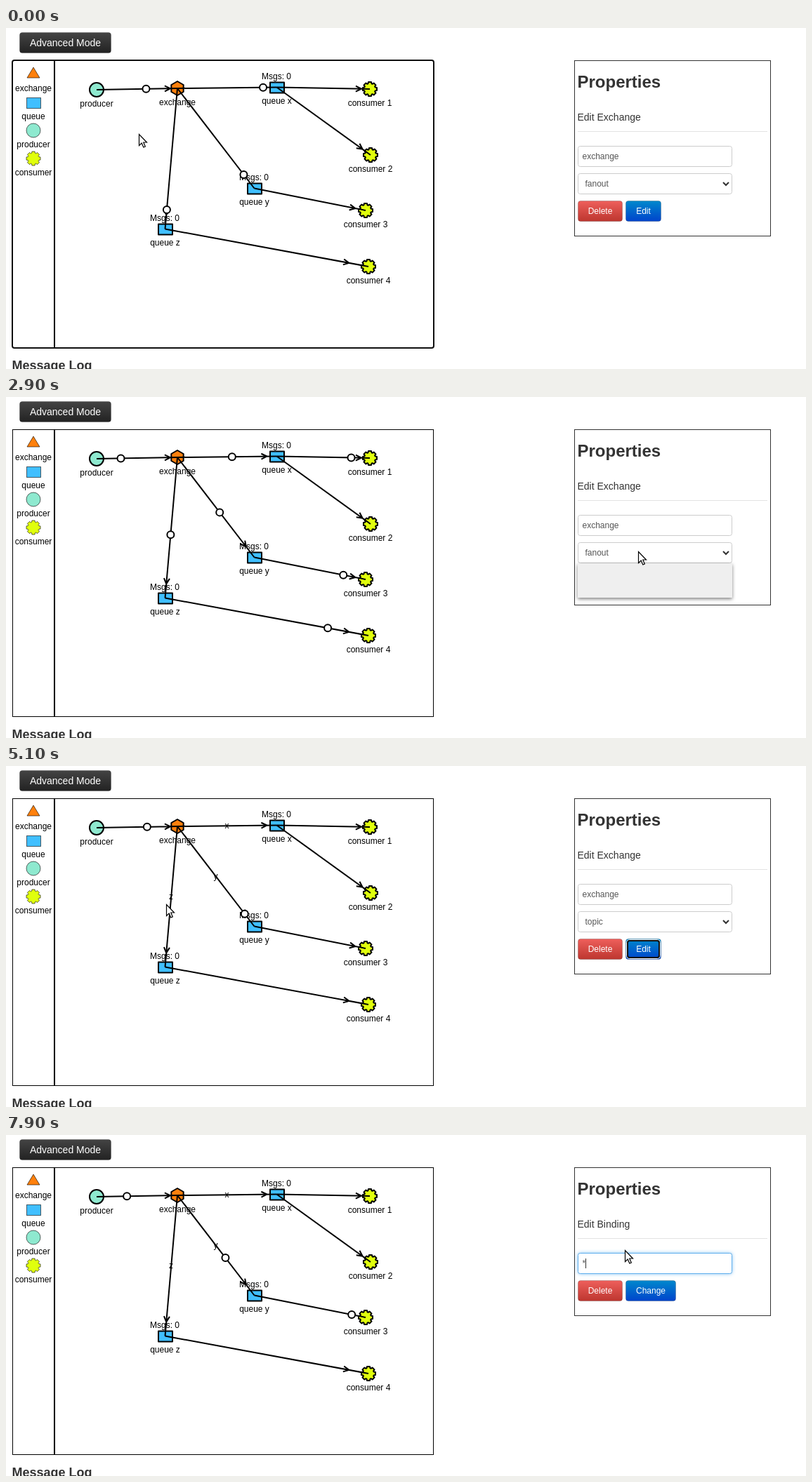
Write an HTML page that moves like this. It is 1139x486 px and loops after 8000 ms.

```html
<!DOCTYPE html>
<html lang="en">
<head>
<meta charset="utf-8">
<title>Message routing simulator</title>
<style>
html, body { margin: 0; width: 100%; height: 100%; overflow: hidden; background: #fff; }
svg { display: block; }
text { font: 12px "Liberation Sans", Arial, sans-serif; white-space: pre; }
.node { stroke: #000; stroke-width: 2; stroke-linejoin: round; }
.icon { stroke: #000; stroke-opacity: .6; stroke-width: 1; }
.line { fill: none; stroke: #000; stroke-width: 2; }
.mid { text-anchor: middle; }
.white { fill: #fff; }
.field { fill: #555; }
.box { fill: #fff; stroke: #ccc; }
</style>
</head>
<body>
<svg width="1139" height="486" viewBox="0 0 1139 486">
  <defs>
    <linearGradient id="dark" x2="0" y2="1"><stop stop-color="#444"/><stop offset="1" stop-color="#222"/></linearGradient>
    <linearGradient id="red" x2="0" y2="1"><stop stop-color="#ee5f5b"/><stop offset="1" stop-color="#bd362f"/></linearGradient>
    <linearGradient id="blue" x2="0" y2="1"><stop stop-color="#08c"/><stop offset="1" stop-color="#04c"/></linearGradient>
    <filter id="shadow" x="-10%" y="-20%" width="120%" height="150%"><feDropShadow dx="0" dy="2" stdDeviation="2.5" flood-opacity=".5"/></filter>
    <filter id="glow" x="-10%" y="-50%" width="120%" height="200%"><feDropShadow dx="0" dy="0" stdDeviation="2.5" flood-color="#52a8ec" flood-opacity=".7"/></filter>
  </defs>
  <g id="page"></g>
  <g id="live"></g>
</svg>
<script>
const LOOP = 8000, STEP = 100, LEG = 800, EMIT = 1000;
const ORANGE = '#ff800d', BLUE = '#40bfff', MINT = '#8ee9cf', LIME = '#e0ff0d';

const text = (x, y, s, cls = '', style = '') => `<text x="${x}" y="${y}" class="${cls}" style="${style}">${s}</text>`;
const rect = (x, y, w, h, attrs) => `<rect x="${x}" y="${y}" width="${w}" height="${h}" ${attrs}/>`;
const path = (d, attrs) => `<path d="${d}" ${attrs}/>`;
const circle = (x, y, r, attrs) => `<circle cx="${x}" cy="${y}" r="${r}" ${attrs}/>`;
const polar = (x, y, r, a) => `${(x + r * Math.cos(a)).toFixed(2)} ${(y + r * Math.sin(a)).toFixed(2)}`;

function button(x, y, w, label, fill, size = 12) {
  return rect(x + .5, y + .5, w - 1, 29, `rx="3.5" fill="${fill}" stroke="#000" stroke-opacity=".2"`) +
    text(x + w / 2, y + (size > 12 ? 20 : 19), label, 'mid white', `font-size:${size}px`);
}

// Shapes
function gear(x, y, cls) {
  const points = [];
  for (let i = 0; i < 8; i++) {
    const a = i * Math.PI / 4;
    for (const [r, da] of [[8, -.32], [10.2, -.2], [10.2, .2], [8, .32]]) points.push(polar(x, y, r, a + da));
  }
  return path(`M${points.join('L')}Z`, `fill="${LIME}" class="${cls}"`);
}
function hexagon(x, y) {
  const points = [...Array(6)].map((_, i) => polar(x, y, 10, (i + .5) * Math.PI / 3));
  return path(`M${points.join('L')}Z`, `fill="${ORANGE}" class="node"`);
}

const nodes = {
  producer: [129, 88, 'producer', 112],
  exchange: [244, 86, 'exchange', 110],
  x: [385.5, 84.5, 'queue x', 108],
  y: [353.5, 228.5, 'queue y', 252],
  z: [226.5, 286.5, 'queue z', 310],
  c1: [518, 87, 'consumer 1', 111],
  c2: [519, 181, 'consumer 2', 205],
  c3: [512, 260, 'consumer 3', 284],
  c4: [516, 340, 'consumer 4', 364]
};
// start node, end node, gap between arrow tip and end node
const edges = [
  ['producer', 'exchange', 10], ['exchange', 'x', 14], ['exchange', 'y', 19], ['exchange', 'z', 20],
  ['x', 'c1', 12], ['x', 'c2', 14], ['y', 'c3', 15], ['z', 'c4', 28]
];

function nodeShape(key) {
  const [x, y, label, baseline] = nodes[key];
  const caption = text(x, baseline, label, 'mid');
  if (key === 'producer') return circle(x, y, 10, `fill="${MINT}" class="node"`) + caption;
  if (key === 'exchange') return hexagon(x, y) + caption;
  if (key[0] === 'c') return gear(x, y, 'node') + caption;
  return rect(x - 9.5, y - 7, 20, 15, `fill="${BLUE}" class="node"`) + caption + text(x - .5, baseline - 35, 'Msgs: 0', 'mid');
}
function edgeShape([from, to, gap]) {
  const [x1, y1] = nodes[from], [x2, y2] = nodes[to];
  const a = Math.atan2(y2 - y1, x2 - x1);
  const tx = x2 - gap * Math.cos(a), ty = y2 - gap * Math.sin(a);
  const wing = side => polar(tx, ty, 9, a + Math.PI + side * .46);
  return path(`M${x1} ${y1}L${x2} ${y2}M${wing(1)}L${tx} ${ty}L${wing(-1)}`, 'class="line"');
}

document.getElementById('page').innerHTML =
  button(19, 6, 131, 'Advanced Mode', 'url(#dark)', 14) +
  rect(9.5, 46.5, 599, 409, 'fill="#fff" stroke="#000"') +
  path('M69 46V456', 'class="line"') +
  path('M39 56L48 71H30Z', `fill="${ORANGE}" class="icon"`) + text(39, 90, 'exchange', 'mid') +
  rect(29.5, 99.5, 20, 15, `fill="${BLUE}" class="icon"`) + text(39, 130, 'queue', 'mid') +
  circle(39, 146, 10, `fill="${MINT}" class="icon"`) + text(39, 170, 'producer', 'mid') +
  gear(39, 186, 'icon') + text(39, 210, 'consumer', 'mid') +
  text(8.5, 487, 'Message Log', '', 'font-size:18px;font-weight:bold;fill:#333') +
  text(813.5, 85, 'Properties', '', 'font-size:24px;font-weight:bold;fill:#333') +
  path('M814 147.5H1084', 'stroke="#e3e3e3"') +
  Object.keys(nodes).map(nodeShape).join('') + edges.map(edgeShape).join('');

// Simulation time: the page stalls briefly while the list opens
function simClock(t) {
  if (t < 2700) return Math.min(t, 2400) + 490;
  return t + (t < 3500 ? 340 : 400);
}

function messages(clock) {
  const dots = [];
  const newest = Math.floor(clock / EMIT);
  for (let n = newest - 2; n <= newest; n++) {
    const age = clock - n * EMIT, leg = Math.floor(age / LEG), p = age / LEG - leg;
    const queues = n < 4 ? ['x', 'y', 'z'] : ['y'];
    const consumers = { x: n % 2 ? 'c1' : 'c2', y: 'c3', z: 'c4' };
    const hops = [[['producer', 'exchange']], queues.map(q => ['exchange', q]), queues.map(q => [q, consumers[q]])][leg] || [];
    for (const [from, to] of hops) {
      const [x1, y1] = nodes[from], [x2, y2] = nodes[to];
      dots.push(circle(x1 + (x2 - x1) * p, y1 + (y2 - y1) * p, 5, 'fill="#fff" class="node"'));
    }
  }
  return dots.join('');
}

// time, x, y
const pointer = [
  [0, 189, 151], [800, 189, 151], [1400, 255, 73], [1700, 255, 73], [1800, 535, 137], [2400, 811, 195],
  [2700, 900, 220], [3000, 900, 220], [3400, 885, 277], [3600, 885, 277], [4000, 908, 262], [4400, 908, 262],
  [5000, 228, 197], [5500, 228, 197], [6500, 848, 194], [6800, 848, 194], [7100, 881, 164], [LOOP, 881, 164]
];
function cursor(t) {
  const i = pointer.findIndex(k => k[0] > t);
  const [t0, x0, y0] = pointer[i - 1], [t1, x1, y1] = pointer[i];
  const p = (t - t0) / (t1 - t0), x = x0 + (x1 - x0) * p, y = y0 + (y1 - y0) * p;
  const at = `transform="translate(${x} ${y})"`;
  if (t >= 6400 && t <= 6900)
    return path('M-3-7.5H-1L0-6.5 1-7.5H3M0-6.5V7M-3 8H-1L0 7 1 8H3', `${at} fill="none" stroke="#000" stroke-width="1.6"`);
  if (t >= 3900 && t <= 4400)
    return path('M0 .5Q1.5-.5 2 1.5V6L9 7.5Q10.5 8 10 10L9 13V16H1V13L-4 8.5Q-4 6.5-2 7.5L-.5 9V1Z', `${at} fill="#fff" stroke="#000" stroke-width="1.2"`) +
      path('M3 9V12M5 9V12M7 9V12', `${at} stroke="#000"`);
  return path('M.5.5V16.5L4.2 13 6.8 19 9.3 18 6.8 12H11.5Z', `${at} fill="#fff" stroke="#000" stroke-width="1.2"`);
}

function focusRing(x, y, w, h) {
  return rect(x, y, w, h, 'rx="3" fill="none" stroke="#101010" stroke-width="2"');
}

function exchangePanel(t) {
  const open = t >= 2700 && t < 3600;
  let out = rect(809.5, 46.5, 279, 250, 'fill="none" stroke="#333"') +
    text(813.5, 132, 'Edit Exchange', '', 'font-size:14px;fill:#333') +
    rect(814.5, 168.5, 219, 29, 'rx="3" class="box"') + text(820.5, 187, 'exchange', 'field') +
    rect(814.5, 207.5, 219, 29, 'rx="3" class="box"') + text(824.5, 226, t < 3600 ? 'fanout' : 'topic', 'field') +
    path('M1021 220L1025 224 1029 220', 'fill="none" stroke="#333" stroke-width="2"') +
    button(814, 246, 64, 'Delete', 'url(#red)') +
    button(882, 246, 51, 'Edit', t >= 4000 && t <= 4400 ? '#04c' : 'url(#blue)');
  if (t >= 3600 && t < 4300) out += focusRing(817, 209, 214, 26);
  if (t >= 4300) out += rect(883.5, 247.5, 48, 27, 'rx="4" fill="none" stroke="#fff"') + focusRing(885, 249, 45, 24);
  if (open) {
    out += rect(814, 237, 220, 49, 'fill="#efefef" filter="url(#shadow)"');
    if (t >= 3000) {
      const hover = t < 3200 ? 1 : 2;
      out += rect(814, 237 + hover * 16.4, 220, 16.4, 'fill="#c8c8c8"') +
        ['direct', 'fanout', 'topic'].map((s, i) => text(824.5, 249.5 + i * 16.4, s)).join('');
    }
  }
  return out;
}

function bindingPanel(t) {
  const value = t < 7400 ? 'z' : t < 7700 ? '' : '*';
  const focus = Math.max(0, Math.min(1, (t - 6600) / 200));
  const caretX = 821.5 + { z: 6, '*': 4, '': 0 }[value];
  return rect(809.5, 46.5, 279, 211, 'fill="none" stroke="#333"') +
    text(813.5, 132, 'Edit Binding', '', 'font-size:14px;fill:#333') +
    rect(814.5, 168.5, 219, 29, 'rx="3" class="box"') +
    rect(814.5, 168.5, 219, 29, `rx="3" fill="#fff" stroke="#62b0ee" filter="url(#glow)" opacity="${focus}"`) +
    text(820.5, 187, value, 'field') +
    (focus ? path(`M${caretX} 176V190`, 'stroke="#333"') : '') +
    button(814, 207, 64, 'Delete', 'url(#red)') + button(882, 207, 72, 'Change', 'url(#blue)');
}

const live = document.getElementById('live');
function draw(t) {
  const canvasFocused = t < 2700 || (t >= 5500 && t < 6600);
  live.innerHTML =
    (canvasFocused ? focusRing(9, 46, 600, 410) : '') +
    (t >= 4300 ? text(314.5, 89, 'x', 'mid') + text(298.5, 161, 'y', 'mid') + text(235, 190, 'z', 'mid') : '') +
    messages(simClock(t)) +
    (t < 5500 ? exchangePanel(t) : bindingPanel(t)) +
    cursor(t);
}

const start = performance.now();
let shown = -1;
function tick() {
  const t = Math.floor((performance.now() - start) % LOOP / STEP) * STEP;
  if (t !== shown) draw(shown = t);
  requestAnimationFrame(tick);
}
tick();
</script>
</body>
</html>
```
